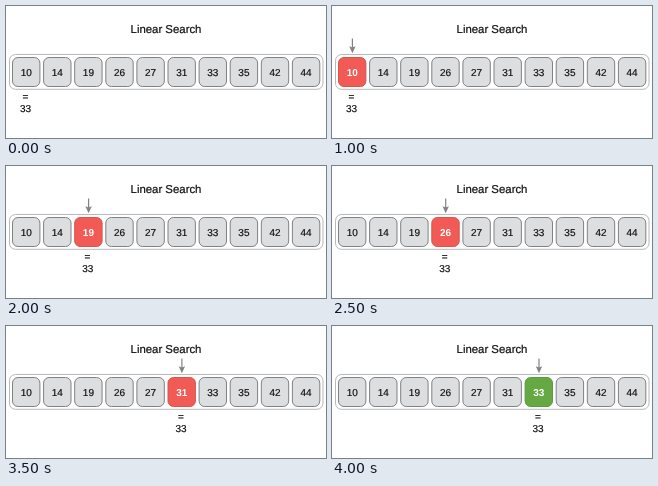
Recreate the animation shown at these times as an HTML page with a canvas. Size 320x132 px, loop 5500 ms.

```html
<!DOCTYPE html>
<html lang="en">
<head>
<meta charset="utf-8">
<title>Linear Search</title>
<style>
  html, body { margin: 0; width: 100%; height: 100%; overflow: hidden; background: #fff; }
  canvas { display: block; }
</style>
</head>
<body>
<canvas id="stage" width="320" height="132"></canvas>
<script>
const ctx = document.getElementById('stage').getContext('2d');
const values = [10, 14, 19, 26, 27, 31, 33, 35, 42, 44];
const wanted = 33;
const found = values.indexOf(wanted);
const LOOP = 5500, START = 1000, STEP = 500;
const FONT = '"Liberation Sans", Arial, sans-serif';

const centerOf = index => 20.2 + index * 31.1;

function text(str, x, baseline, size, color = '#111', weight = 'normal') {
  ctx.font = `${weight} ${size}px ${FONT}`;
  ctx.textRendering = 'geometricPrecision';
  ctx.fillStyle = ctx.strokeStyle = color;
  ctx.lineWidth = 0.2;
  ctx.fillText(str, x, baseline);
  if (weight === 'normal') ctx.strokeText(str, x, baseline);
}

function box(x, y, w, h, radius, fill, stroke, lineWidth) {
  ctx.beginPath();
  ctx.roundRect(x, y, w, h, radius);
  ctx.fillStyle = fill;
  ctx.fill();
  ctx.strokeStyle = stroke;
  ctx.lineWidth = lineWidth;
  ctx.stroke();
}

function arrow(x) {
  ctx.strokeStyle = ctx.fillStyle = '#808285';
  ctx.lineWidth = 1.2;
  ctx.beginPath();
  ctx.moveTo(x, 32.5);
  ctx.lineTo(x, 42);
  ctx.stroke();
  ctx.beginPath();
  ctx.moveTo(x - 3.2, 40.3);
  ctx.lineTo(x, 41.5);
  ctx.lineTo(x + 3.2, 40.3);
  ctx.lineTo(x, 47.2);
  ctx.fill();
}

function cell(value, index, active) {
  const x = centerOf(index);
  const [fill, stroke] = !active ? ['#dddee0', '#808184']
    : value === wanted ? ['#65a844', '#5c9b3f'] : ['#f15a55', '#d6554f'];
  box(x - 13.7, 51.5, 27.4, 29, 5.5, fill, stroke, 1);
  text(value, x, 69.6, 10, active ? '#fff' : '#111', active ? 'bold' : 'normal');
}

function draw(now) {
  const time = now % LOOP;
  const current = Math.min(Math.floor((time - START) / STEP), found);
  const x = centerOf(Math.max(current, 0));

  ctx.fillStyle = '#fff';
  ctx.fillRect(0, 0, 320, 132);
  ctx.textAlign = 'center';
  text('Linear Search', 160, 27, 11.4);
  box(3.5, 48.5, 313.5, 34.8, 6, '#fff', '#a5a6a8', 0.8);
  values.forEach((value, i) => cell(value, i, i === current));
  if (current >= 0) arrow(x + 0.2);
  text('=', x - 0.9, 94.3, 10);
  text(wanted, x - 0.7, 106, 10);
  requestAnimationFrame(draw);
}

requestAnimationFrame(draw);
</script>
</body>
</html>
```
